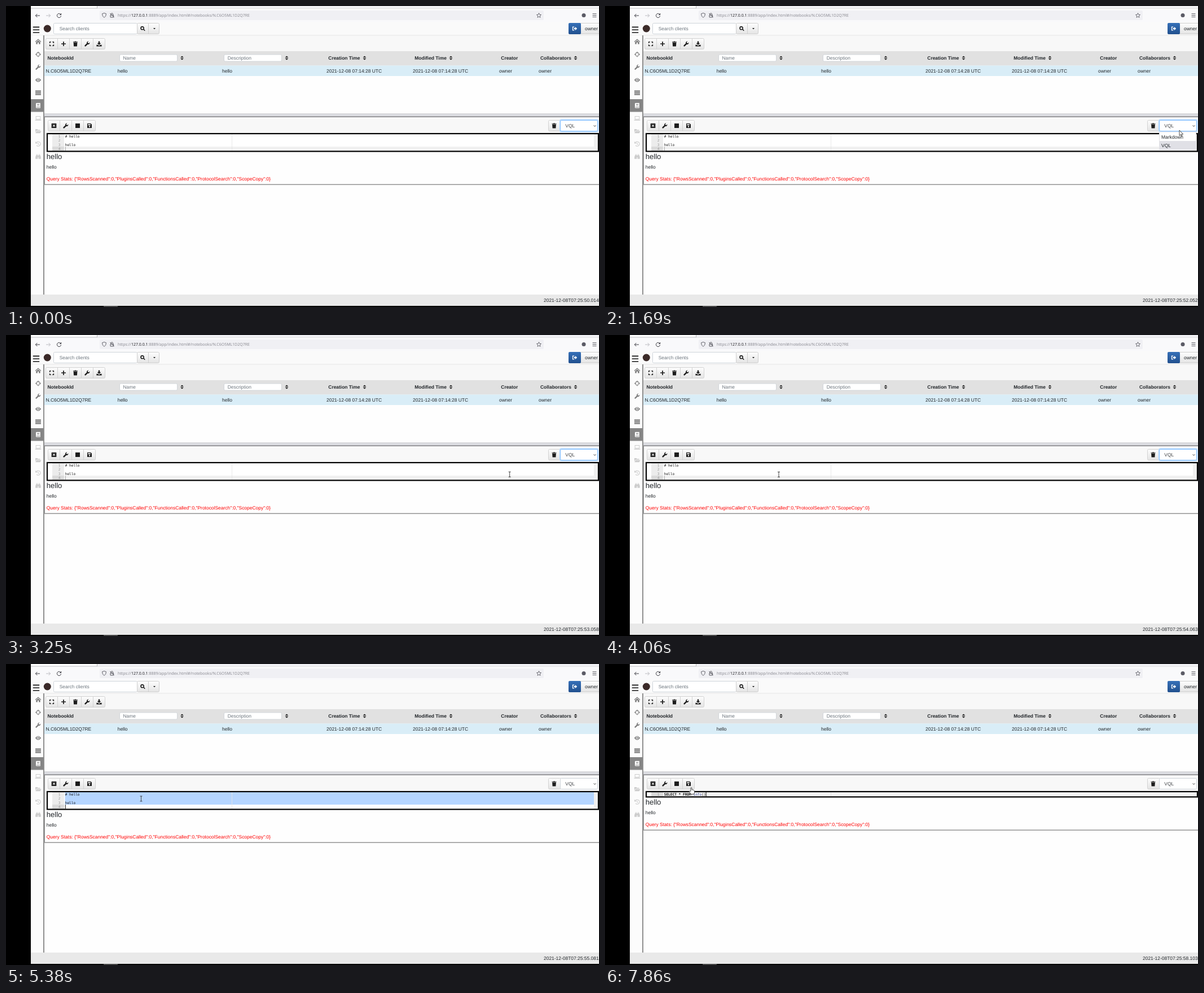
Write an HTML page that moves like this. It is 1051 by 533 pixels and loops after 8000 ms.

```html
<!DOCTYPE html>
<html lang="en">
<head>
<meta charset="utf-8">
<title>Notebook editor</title>
<style>
html, body { margin: 0; width: 100%; height: 100%; overflow: hidden; background: #fff; }
svg { display: block; width: 1051px; height: 533px; }
text { font-family: "Liberation Sans", Arial, sans-serif; font-size: 8.45px; fill: #212529; white-space: pre; text-rendering: geometricPrecision; }
.b { font-weight: bold; }
.ph { fill: #6c757d; }
.url { font-family: "Open Sans", sans-serif; font-size: 7.03px; fill: #85858d; }
.code { font-family: "DejaVu Sans Mono", monospace; font-size: 6.15px; fill: #111; }
.num { fill: #999; text-anchor: end; }
</style>
</head>
<body>
<svg id="stage" viewBox="0 0 1051 533" xmlns="http://www.w3.org/2000/svg"></svg>
<script>
const LOOP = 8000;
const EDIT = { focus: 4590, selectAll: 5380, paste: 6380 };
const POPUP = { open: 1690, close: 2780 };

// Icons are centred on 0,0.
const FILLED = {
  home: 'M-5.3 0L0-4.8 5.3 0 4.5.9 0-3.1-4.5.9zM-3.7 1.3L0-2 3.7 1.3V4.4H1.1V1.6H-1.1V4.4H-3.7z',
  wrench: 'M4.3-2.6L2.5-1.1 1.1-1.5.8-2.9 2.5-4.4A2.9 2.9 0 0 0-.9-.8L-4.3 2.6A1.2 1.2 0 0 0-2.6 4.3L.8.9A2.9 2.9 0 0 0 4.3-2.6z',
  eye: 'M-5.2 0Q0-7 5.2 0Q0 7-5.2 0zM-2.4 0a2.4 2.4 0 1 0 4.8 0a2.4 2.4 0 1 0-4.8 0zM-1.4 0a1.4 1.4 0 1 0 2.8 0a1.4 1.4 0 1 0-2.8 0z',
  server: 'M-5-4.2h10v2.4h-10zM-5-1.2h10v2.4h-10zM-5 1.8h10v2.4h-10z',
  book: 'M-3-4.5h6.8v9H-3a1.2 1.2 0 0 1-1-1.2v-6.6a1.2 1.2 0 0 1 1-1.2zM-2-2.5h4.2v.9h-4.2zM-2-.8h4.2v.9h-4.2zM-3 2.3h6v1h-6z',
  laptop: 'M-4.3-4h8.6v6.2h-8.6zM-3.3-3v4.2h6.6v-4.2zM-5.6 2.7h11.2q0 1.4-1.2 1.4h-8.8q-1.2 0-1.2-1.4z',
  folder: 'M-5-3.6h3.6l1.2 1.2h3.8v1.6h-6.6L-5 2.4zM-2.6 0H5.6L3.6 3.6H-4.8z',
  binoculars: 'M-4.8 4V.5L-3.5-3h2.9V4zM.6-3h2.9L4.8.5V4H.6zM-.6-2h1.2v3h-1.2zM-3.3-4.3h2.5v.8h-2.5zM.8-4.3h2.5v.8H.8z',
  trash: 'M-4-3.8h2.4l.5-.8h2.2l.5.8H4v1.1h-8zM-3.4-2.2h6.8l-.5 6.6h-5.8z',
  download: 'M-1.2-4.5h2.4v3.3h2.2L0 2-3.4-1.2h2.2zM-4.6 1.7h2.3L0 3.6 2.3 1.7h2.3v2.8h-9.2z',
  close: 'M-4.3-4.1h8.6v8.2h-8.6zM-2.3-1.5L-.8 0-2.3 1.5-1.5 2.3 0 .8 1.5 2.3 2.3 1.5.8 0 2.3-1.5 1.5-2.3 0-.8-1.5-2.3z',
  stop: 'M-4-4h8v8h-8z',
  save: 'M-4-4h6.2L4-2.2V4H-4zM-2.8-2.8v2h4.6v-2zM-1.3 1.5a1.3 1.3 0 1 0 2.6 0a1.3 1.3 0 1 0-2.6 0z',
  sort: 'M-2.9-.7L0-3.6 2.9-.7zM-2.9.7L0 3.6 2.9.7z',
  caret: 'M-2-1H2L0 1.2z',
  signout: 'M-4.2-3.5h3.3v1.2h-2.1v4.6h2.1v1.2h-3.3zM-1.6-1.1H.7v-2.2L4.2 0 .7 3.3V1.1h-2.3z'
};
const STROKED = {
  target: ['M-3.3 0a3.3 3.3 0 1 0 6.6 0a3.3 3.3 0 1 0-6.6 0M0-4.8V-1.8M0 4.8V1.8M-4.8 0H-1.8M4.8 0H1.8', 1.1],
  history: ['M-3.6-1.6A4 4 0 1 1-2.8 2.8M-4.4-4V-1.3H-1.7M0-2.2V.4L1.6 1.4', 1.1],
  expand: ['M-3.4-1.2V-3.4H-1.2M1.2-3.4H3.4V-1.2M3.4 1.2V3.4H1.2M-1.2 3.4H-3.4V1.2', 1.4],
  plus: ['M-4 0H4M0-4V4', 1.7],
  search: ['M1.7-.8a2.6 2.6 0 1 0-5.2 0a2.6 2.6 0 1 0 5.2 0M1.2 1.2L3.7 3.7', 1.6],
  back: ['M4 0H-3.6M-.6-3L-3.6 0-.6 3', 1],
  forward: ['M-4 0H3.6M.6-3L3.6 0 .6 3', 1],
  reload: ['M3.2-1.8A3.6 3.6 0 1 0 3.6.6M3.7-4V-1.4H1.1', 1],
  shield: ['M0-4L3.5-2.8Q3.6 2 0 4Q-3.6 2-3.5-2.8z', .9],
  lock: ['M-3-.4H2.6V3.4H-3zM-1.9-.4V-2a1.7 1.7 0 0 1 3.4 0V-.4M-3.6-3.6L3.6 3.6', 1],
  star: ['M0-4L1.2-1.3 4-1 1.9.9 2.5 3.8 0 2.3-2.5 3.8-1.9.9-4-1-1.2-1.3z', .8],
  menu: ['M-3.5-2.8H3.5M-3.5 0H3.5M-3.5 2.8H3.5', .9],
  burger: ['M-5.7-4.8H5.7M-5.7 0H5.7M-5.7 4.8H5.7', 1.6],
  chevron: ['M-1.9-.9L0 1 1.9-.9', 1]
};

const rect = (x, y, w, h, fill, extra = '') =>
  `<rect x="${x}" y="${y}" width="${w}" height="${h}" fill="${fill}" ${extra}/>`;
const label = (x, y, str, cls = '', extra = '') =>
  `<text x="${x}" y="${y}" class="${cls}" ${extra}>${str}</text>`;
function icon(name, x, y, color = '#1c1c1c') {
  const s = STROKED[name];
  const look = s ? `fill="none" stroke="${color}" stroke-width="${s[1]}"` : `fill="${color}" fill-rule="evenodd"`;
  return `<path transform="translate(${x} ${y})" d="${s ? s[0] : FILLED[name]}" ${look}/>`;
}
const box = (x, y, w, h, fill, line) => rect(x + .5, y + .5, w - 1, h - 1, fill, `stroke="${line}" rx="2"`);
function buttons(x, y, w, step, names) {
  let out = box(x, y, w, 20, 'url(#btn)', '#d2d2d2');
  names.forEach((n, i) => {
    if (i) out += rect(x + i * step, y + 1, 1, 18, '#d2d2d2');
    out += icon(n, x + 11 + i * step, y + 10);
  });
  return out;
}

function browserBar() {
  return rect(44, 0, 1007, 5, '#f0f0f4') + rect(44, 0, 117, 4, '#fff') + rect(44, 3.5, 118, 1, '#c4c4c8') +
    rect(161, 0, 1, 4, '#bbb') + rect(162, 4, 889, .7, '#ddd') +
    rect(44, 5, 1007, 23, '#f9f9fb') + rect(166, 8, 787, 17, '#f0f0f4', 'rx="2"') +
    icon('back', 56, 17, '#3a3a42') + icon('forward', 75, 17, '#bbbbc0') + icon('reload', 94, 17, '#3a3a42') +
    icon('shield', 174, 16.5, '#55555d') + icon('lock', 188, 16.5, '#55555d') +
    label(198, 19.3, 'https://<tspan fill="#15141a">127.0.0.1</tspan>:8889/app/index.html#/notebooks/N.C6O5ML1D2Q7RE', 'url') +
    icon('star', 944.5, 16.5, '#4a4a52') + '<circle cx="1024" cy="16.5" r="3.5" fill="#5b5b66"/>' +
    icon('menu', 1043, 16.5, '#4a4a52');
}

function header() {
  return rect(44, 28, 1007, 24, '#fafafa') + rect(44, 51.5, 1007, 1, '#e4e4e4') +
    icon('burger', 53.5, 42.2, '#111') + '<circle cx="73.3" cy="40" r="6.5" fill="#3b2a28"/>' +
    box(84, 30, 149, 20, '#fff', '#ced4da') + label(94.7, 43, 'Search clients', 'ph') +
    box(232, 30, 40, 20, 'url(#btn)', '#cfcfcf') + rect(252, 31, 1, 18, '#cfcfcf') +
    icon('search', 242.5, 40) + icon('caret', 263, 40) +
    box(997, 30, 60, 20, 'url(#btn)', '#cfcfcf') + rect(997, 30, 22, 20, 'url(#blue)', 'rx="2"') +
    icon('signout', 1008, 40, '#fff') + label(1026, 43, 'owner');
}

function sidebar() {
  const names = ['home', 'target', 'wrench', 'eye', 'server', 'book', 'laptop', 'folder', 'history', 'binoculars'];
  return rect(44, 52, 22, 459, '#fcfcfc') + rect(44, 165, 22, 22.5, '#858585') +
    names.map((n, i) => icon(n, 57, 63 + i * 22.65, i === 5 ? '#fff' : i > 5 ? '#cdcdcd' : '#7d7d7d')).join('') +
    rect(66, 52, 2, 459, '#8f8f8f');
}

function table() {
  const row = [[70.5, 'N.C6O5ML1D2Q7RE'], [197.7, 'hello'], [383, 'hello'], [568, '2021-12-08 07:14:28 UTC'],
    [721, '2021-12-08 07:14:28 UTC'], [874, 'owner'], [944, 'owner']];
  const heads = [[73.5, 'NotebookId'], [571.3, 'Creation Time'], [724.3, 'Modified Time'], [877.3, 'Creator'], [947, 'Collaborators']];
  return rect(68, 53, 983, 27, '#f8f8f8') +
    buttons(70, 57, 106, 21, ['expand', 'plus', 'trash', 'wrench', 'download']) +
    rect(68, 80, 983, 25.5, '#e1e1e1') + rect(68, 105.5, 983, 18.5, '#d9edf7') +
    box(201, 85.5, 103, 13, '#fff', '#d2d6da') + label(207.5, 95, 'Name', 'ph') +
    box(386, 85.5, 103, 13, '#fff', '#d2d6da') + label(392.7, 95, 'Description', 'ph') +
    heads.map(([x, s]) => label(x, 95, s, 'b')).join('') +
    [312, 497.5, 635.5, 788.5, 1009.5].map(x => icon('sort', x, 92)).join('') +
    row.map(([x, s]) => label(x, 118, s)).join('') +
    rect(68, 190.5, 983, 5, '#dcdde2') + rect(68, 190.5, 983, .8, '#c9c9cc');
}

function editor() {
  const lines = ['# hello', '', 'hello', ''];
  const four = lines.map((s, i) => label(96.5, 233 + i * 7.35, i + 1, 'code num') + label(104.7, 233 + i * 7.35, s, 'code')).join('');
  return rect(73, 226, 977, 100, '#fff', 'id="paper"') +
    rect(82, 227, 21, 29, '#ececec', 'id="gutter"') +
    rect(82, 227, 21, 7.4, '#dadada', 'id="activeNum"') +
    rect(104, 227, 938, 7.4, '#f1f1f1', 'id="activeLine"') +
    rect(104.5, 227, 937.5, 22, '#b5d5ff', 'id="selection"') +
    rect(400, 227, .8, 29, '#e4e4e4', 'id="margin"') +
    rect(1042, 227, 7, 29, '#f0f0f0', 'id="scrollbar"') +
    `<g id="oldText">${four}</g>` +
    '<g id="newText">' + label(96.5, 233, 1, 'code num') +
    label(104.7, 233, '<tspan class="b">SELECT * FROM</tspan> <tspan fill="#3c4c9a">info</tspan>()', 'code') + '</g>' +
    rect(105, 227, 1, 7.4, '#111', 'id="textCaret"') +
    '<rect id="frame" x="73" y="226" width="977" height="31" fill="none" stroke="#000" stroke-width="2.2"/>';
}

function cell() {
  const stats = 'Query Stats: {"RowsScanned":0,"PluginsCalled":0,"FunctionsCalled":0,"ProtocolSearch":0,"ScopeCopy":0}';
  return rect(68, 197, 983, 28, '#f8f8f8') + rect(68, 195.3, 983, 1.7, '#8b8b8f') +
    rect(67.5, 196, 1.5, 120, '#8f8f8f', 'id="cellSide"') +
    buttons(74, 202, 85, 21, ['close', 'wrench', 'stop', 'save']) +
    box(961, 202, 23, 20, 'url(#btn)', '#d2d2d2') + icon('trash', 971.5, 212) +
    box(982, 202, 67, 20, '#fff', '#ced4da') +
    '<g id="focusRing" fill="none"><rect x="981.8" y="201.3" width="67.6" height="21.4" rx="2.5" stroke="#bfdeff" stroke-width="2"/>' +
    '<rect x="982.5" y="202.5" width="66" height="19" rx="2" stroke="#80bdff"/></g>' +
    label(991.3, 215, 'VQL', '', 'fill-opacity=".85"') + icon('chevron', 1043.5, 212.3, '#333') +
    editor() +
    '<g id="result">' + label(71.8, 271.3, 'hello', '', 'style="font-size:13px"') + label(71.8, 288.2, 'hello') +
    label(71.8, 309.3, stats, '', 'style="fill:#f00"') + rect(68, 315.3, 983, 1.7, '#a0a0a0') + '</g>';
}

const popup = '<g id="popup">' + rect(982, 223, 66, 31.5, '#fff') + rect(982.5, 223, 65, 31, 'none', 'stroke="#e2e2e6"') +
  rect(983, 239, 65, 15, '#e0e0e6', 'id="hover"') +
  label(986, 235, 'Markdown') + label(986, 249.7, 'VQL') + '</g>';

const pointers =
  '<path id="arrow" d="M0 0V9.6L2.2 7.6 3.6 10.7 5 10.1 3.6 7H6.7z" fill="#fff" stroke="#222" stroke-width=".8"/>' +
  '<path id="beam" d="M-2-4.5H2M-2 4.5H2M0-4.5V4.5" fill="none" stroke="#333" stroke-width=".9"/>' +
  '<path id="hand" d="M-1 1Q0-.5 1 1V4.2Q5.5 4.4 5.6 6.2V9Q5 10.5 4.6 12H-.6Q-2.6 9.5-3.6 7.2-3.3 5.6-1 7z" fill="#fff" stroke="#222" stroke-width=".8"/>';

document.getElementById('stage').innerHTML =
  '<defs><linearGradient id="btn" x2="0" y2="1"><stop stop-color="#fdfdfd"/><stop offset="1" stop-color="#e4e4e4"/></linearGradient>' +
  '<linearGradient id="blue" x2="0" y2="1"><stop stop-color="#3670b8"/><stop offset="1" stop-color="#21508e"/></linearGradient></defs>' +
  rect(0, 0, 1051, 533, '#fefefe') + browserBar() + header() + sidebar() + table() + cell() +
  rect(44, 511, 1007, 20, '#e9e9e9') + label(953, 524, '', '', 'id="clock"') +
  rect(0, 0, 44, 533, '#000') + rect(44, 531, 1007, 2, '#000') + rect(173, 531, 25, 2, '#444') +
  popup + pointers;

const $ = id => document.getElementById(id);
const set = (id, attrs) => { for (const k in attrs) $(id).setAttribute(k, attrs[k]); };
const show = (id, on) => { $(id).style.display = on ? '' : 'none'; };

const CLOCK = [[0, '50.014'], [640, '51.033'], [1690, '52.052'], [2710, '53.058'], [3790, '54.063'],
  [4720, '55.081'], [5770, '56.084'], [6850, '57.094'], [7860, '58.103']];

// Pointer moves: start, end, number of steps, then the place reached.
const MOVES = [
  [340, 1030, 11, 1018, 218], [1290, 1360, 2, 1011, 213], [1420, 1490, 2, 1018, 220],
  [1760, 2380, 9, 1005, 247], [3180, 3920, 12, 331, 246], [3990, 4060, 2, 308, 247],
  [4130, 4330, 4, 241, 238], [4590, 4590, 1, 239.5, 238.5], [5570, 5570, 1, 239.3, 237.3],
  [7510, 7860, 6, 153, 218.5]
];

function pointerAt(t) {
  let x = 1058, y = 226;
  for (const [from, to, n, nx, ny] of MOVES) {
    if (t < from) break;
    const done = to > from ? (t - from) / (to - from) : 1;
    const p = Math.min(n, Math.floor(done * (n - 1) + 1e-6) + 1) / n;
    x += (nx - x) * p;
    y += (ny - y) * p;
  }
  return { x, y };
}

function render(t) {
  const pasted = t >= EDIT.paste, focused = t >= EDIT.focus;
  const selected = t >= EDIT.selectAll && !pasted;
  const open = t >= POPUP.open && t < POPUP.close;
  const lift = pasted ? 22 : 0;
  const inner = 29.4 - lift;

  $('clock').textContent = '2021-12-08T07:25:' + CLOCK.filter(c => c[0] <= t).pop()[1];

  set('frame', { height: 31.4 - lift });
  set('paper', { height: 31.4 - lift });
  for (const id of ['gutter', 'margin', 'scrollbar']) set(id, { height: inner });
  set('cellSide', { height: 120 - lift });
  set('result', { transform: `translate(0 ${-lift})` });
  show('oldText', !pasted);
  show('newText', pasted);
  show('selection', selected);
  show('focusRing', !focused);

  const line = pasted ? 0 : focused && !selected ? 1 : 3;
  const top = 227 + line * 7.35;
  set('activeNum', { y: top });
  set('activeLine', { y: top });
  show('activeLine', !selected);
  const blinkOff = (t >= 6030 && t < EDIT.paste) || (t >= 7110 && t < 7600);
  set('textCaret', { x: pasted ? 178.6 : 104.8, y: top, fill: focused ? '#111' : '#aaa' });
  show('textCaret', !blinkOff);

  const { x, y } = pointerAt(t);
  show('popup', open);
  set('hover', { y: y > 225 && y < 239 ? 224 : 239 });

  const overEditor = y > 225 && y < 257 - lift && x < 1042;
  const hidden = t < 340 || (t >= 6030 && t < EDIT.paste);
  const kind = y < 224 && x < 160 ? 'hand'
    : overEditor && !open && !(t >= 5570 && t < EDIT.paste) ? 'beam' : 'arrow';
  for (const id of ['arrow', 'beam', 'hand']) {
    show(id, id === kind && !hidden);
    set(id, { transform: `translate(${x} ${y})` });
  }
}

const start = performance.now();
function tick(now) {
  render(Math.max(0, now - start) % LOOP);
  requestAnimationFrame(tick);
}
render(0);
requestAnimationFrame(tick);
</script>
</body>
</html>
```
